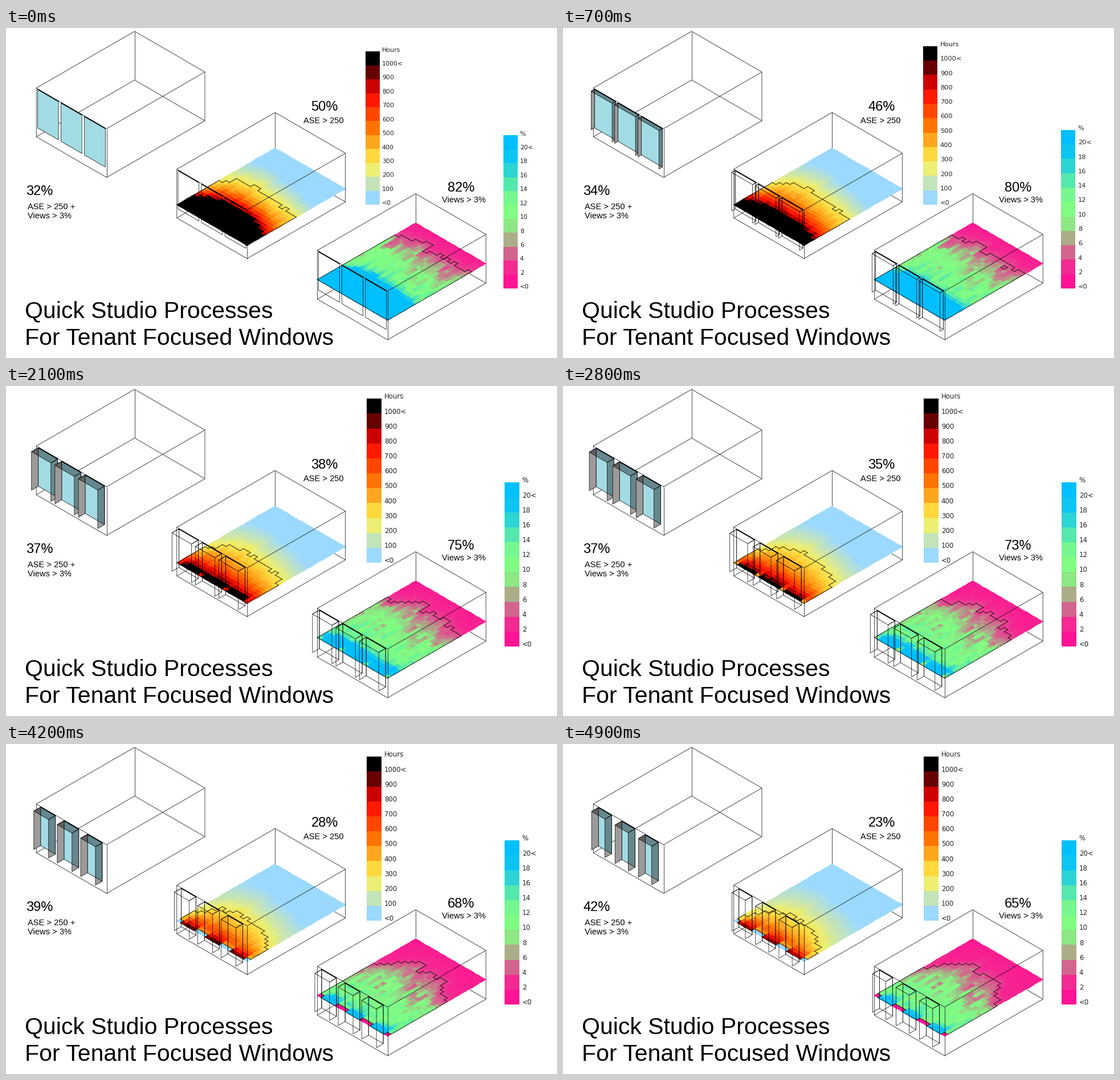
A matplotlib script that plays this animation: 967 px wide and 579 px high, repeating every 5.6 s.

```python
import numpy as np
import matplotlib.pyplot as plt
from matplotlib.animation import FuncAnimation
from matplotlib.collections import LineCollection

W, H, DPI = 967, 579, 64
PX = 72 / DPI                       # points per pixel
FRAMES, STEP = 8, 700

# isometric axes of a room, in pixels: along the facade, into the room, up
U = np.array([123.3, 71.4])
V = np.array([172.5, -99.5])
UP = np.array([0, -85.5])
FIRST, SHIFT = np.array([53.2, 105.3]), np.array([246.6, 142.45])

NU, ND = 20, 28                     # grid cells across and deep
S = ((np.arange(NU) + .5) / NU)[:, None]
D = ((np.arange(ND) + .5) / ND)[None, :]
EDGE = np.abs(2 * S - 1) ** 2.5     # 0 mid-room, 1 at the side walls

# shares of the floor in percent, one per facade variant
BOTH = [32, 34, 38, 37, 37, 38, 39, 42]
ASE = [50, 46, 41, 38, 35, 32, 28, 23]
VIEWS = [82, 80, 79, 75, 73, 70, 68, 65]

SUN_KEYS = {0: "#9bd9ff", 2: "#ecef73", 3: "#ffd83d", 5: "#ff7300",
            7: "#ff1900", 8: "#cd0000", 10: "#000000"}
VIEW_KEYS = {0: "#ff1493", 5: "#80fd82", 10: "#00bfff"}

rng = np.random.default_rng(12)
GRAIN = rng.normal(0, 1, (NU, ND))
TEETH = np.repeat(rng.choice([-1, 0, 1], (2, NU // 2, 1)), 2, axis=1)
STREAK = np.repeat(rng.uniform(-1.5, 1.5, (NU, ND // 3 + 2)), 3, axis=1)
STREAK = np.array([np.roll(row, rng.integers(3)) for row in STREAK])[:, :ND]

fig = plt.figure(figsize=(W / DPI, H / DPI), dpi=DPI, facecolor="white")
ax = fig.add_axes([0, 0, 1, 1])


def line(*pts, width=.7):
    x, y = zip(*pts)
    ax.plot(x, y, color="black", lw=width * PX, solid_capstyle="butt")


def face(pts, color="none", alpha=1.0):
    x, y = zip(*pts)
    if color != "none":
        ax.fill(x, y, color=color, alpha=alpha, lw=0, zorder=2)
    line(*pts, pts[0])


def text(x, y, s, size, font="Liberation Sans", color="black"):
    ax.text(x, y, s, fontsize=size * PX, family=font, color=color,
            ha="left", va="baseline")


def linear(t):
    return t


def smooth(t):
    return (1 - np.cos(np.pi * t)) / 2


def ramp(values, keys, ease):
    """Blend key colours; values run from 0 to 10."""
    stops = np.array(list(keys))
    rgb = np.array([plt.matplotlib.colors.to_rgb(c) for c in keys.values()])
    values = np.asarray(values, float)
    i = np.clip(np.searchsorted(stops, values, "right") - 1, 0, len(stops) - 2)
    t = ease((values - stops[i]) / (stops[i + 1] - stops[i]))[..., None]
    return rgb[i] + (rgb[i + 1] - rgb[i]) * t


def inset(k):
    """Distance in pixels from a bay's side to its window."""
    return 2.2 + 1.35 * max(k - 2, 0)


def pier_shade(k):
    """Loss of light just behind the wall pieces between windows."""
    bay = (S * 3) % 1
    gap = inset(k) * 3 / U[0]
    solid = (bay < gap) | (bay > 1 - gap)
    strength = np.clip((k - 1.5) / 4, 0, 1)
    return 1 - strength * solid * np.exp(-np.arange(ND) * .9)[None, :]


def piecewise(x, xs, ys):
    """Interpolate with knots that vary per column of the grid."""
    knots = [np.broadcast_to(p, S.shape)[:, 0] for p in xs]
    return np.array([np.interp(x[0], col, ys) for col in zip(*knots)])


def sun_hours(k):
    edge = ASE[k] / 100 + .02 + (.1 + .02 * k) * (.4 - EDGE) + .02 * TEETH[0]
    full = (.27 * np.exp(-.45 * k) - .03) * (1.12 - .55 * EDGE)
    zero = .77 - .012 * k + .12 * (.5 - S) - .05 * EDGE + .015 * TEETH[1]
    span = edge - full
    xs = [full, full + .1 * span, full + .3 * span, full + .55 * span, edge,
          edge + .4 * (zero - edge), zero]
    hours = piecewise(D, xs, [1150, 850, 620, 430, 250, 130, 0])
    hours *= 1 + .02 * GRAIN + .02 * STREAK
    return np.clip(hours * pier_shade(k), 0, 1000)


def view_share(k):
    edge = VIEWS[k] / 100 + .015 + .04 * k * (.35 - EDGE) + .03 * TEETH[1]
    full = (.26 * np.exp(-.38 * k) + .02) * (1.12 - .3 * EDGE) + .014 * TEETH[0]
    mid = np.minimum(.56 - .03 * k, edge - .12)
    xs = [full, full + .05, full + .11, mid, mid + .55 * (edge - mid),
          edge, edge + .07, 1.1]
    share = piecewise(D, xs, [20.5, 14, 11.5, 9, 6, 3, 1.8, .8])
    near = np.clip((D - full + .02) * 5, 0, 1)
    far = np.clip((edge + .03 - D) * 5, .08, 1)
    share += near * far * (1.8 * STREAK + .4 * GRAIN)
    return np.clip(share * pier_shade(k), 0, 20)


def plane(origin, values, limit, colors):
    """Coloured grid with an outline around the cells above the limit."""
    def at(i, j):
        return origin + U * i / NU + V * j / ND

    i, j = np.meshgrid(np.arange(NU + 1), np.arange(ND + 1), indexing="ij")
    nodes = at(i[..., None], j[..., None])
    ax.pcolormesh(nodes[..., 0], nodes[..., 1], colors, zorder=2)
    inside = np.pad(values > limit, 1).astype(int)
    segs = [(at(a, b), at(a, b + 1))
            for a, b in np.argwhere(np.diff(inside[:, 1:-1], axis=0))]
    segs += [(at(a, b), at(a + 1, b))
             for a, b in np.argwhere(np.diff(inside[1:-1, :], axis=1))]
    ax.add_collection(LineCollection(segs, colors="black", linewidths=.8 * PX,
                                     capstyle="projecting"))


def windows(origin, k, solid):
    reach = -V / V[0] * 6 * min(k, 2)
    down = np.array([0, 67.5])
    gap = inset(k) / U[0]
    glass, grey, shade = ("#a3dbe4", "#9d9a9a", "black") if solid else ["none"] * 3
    for bay in range(3):
        tl = origin + U * (bay / 3 + gap) + (0, 1)
        tr = origin + U * ((bay + 1) / 3 - gap) + (0, 1)
        bl, br = tl + down, tr + down
        face([tl, tr, br, bl], glass)
        if k:
            face([tl, tl + reach, bl + reach, bl], grey)
            face([tr, tr + reach, br + reach, br], shade, .38)
            face([tl, tr, tr + reach, tl + reach], shade, .38)
        line(tl, tr, width=1.5)


def room(n, k, drop=None, grid=None):
    """Box outline; drop is the depth of the grid plane below the ceiling."""
    a = FIRST + n * SHIFT
    b, c, d = a + U, a + U + V, a + V
    a0, b0, c0, d0 = (p - UP for p in (a, b, c, d))
    line(d, d0)
    line(a0, d0, c0)
    if grid:
        plane(a + (0, drop), *grid)
    line(a, d, c, c0, b0, a0, a)
    line(a, b, c)
    line(b, b0)
    windows(a, k, not grid)


def legend(x, bottom, k, title, labels, colors):
    grow = min(k, 2)
    step = 24.42 + .87 * grow
    x += grow
    right = x + 24.3 + .7 * grow
    label_x = x + 28.5 + grow
    for i, label in enumerate(labels + [title]):
        y = bottom - i * step
        if i < len(labels):
            ax.fill([x, right, right, x], [y, y, y - step, y - step],
                    color=colors[i], lw=0, antialiased=False)
        text(label_x, y + .2, label, 11 + .35 * grow, "DejaVu Sans", "#222222")


def labels(by):
    return ["<0"] + [str(by * n) for n in range(1, 10)] + [f"{by * 10}<"]


def draw(k):
    ax.clear()
    ax.set_xlim(0, W)
    ax.set_ylim(H, 0)
    ax.axis("off")

    sun, view = sun_hours(k), view_share(k)
    room(0, k)
    room(1, k, 62.4, (sun, 250, ramp(sun / 100, SUN_KEYS, linear)))
    room(2, k, 51.2, (view, 3, ramp(view / 2, VIEW_KEYS, smooth)))

    steps = np.arange(11)
    legend(631.3, 310, k, "Hours", labels(100), ramp(steps, SUN_KEYS, linear))
    legend(873.3, 457, k, "%", labels(2), ramp(steps, VIEW_KEYS, smooth))

    text(35.5, 293, f"{BOTH[k]}%", 23.6)
    text(38, 318, "ASE > 250 +", 14.6)
    text(38, 334, "Views > 3%", 14.6)
    text(535.5, 145, f"{ASE[k]}%", 23.6)
    text(522, 167, "ASE > 250", 14.6)
    text(774.5, 287, f"{VIEWS[k]}%", 23.6)
    text(765, 306, "Views > 3%", 14.6)
    text(33, 508.5, "Quick Studio Processes", 41)
    text(33, 556, "For Tenant Focused Windows", 41)


anim = FuncAnimation(fig, draw, frames=FRAMES, interval=STEP,
                     init_func=lambda: None, repeat=True, repeat_delay=0)
plt.show()
```
